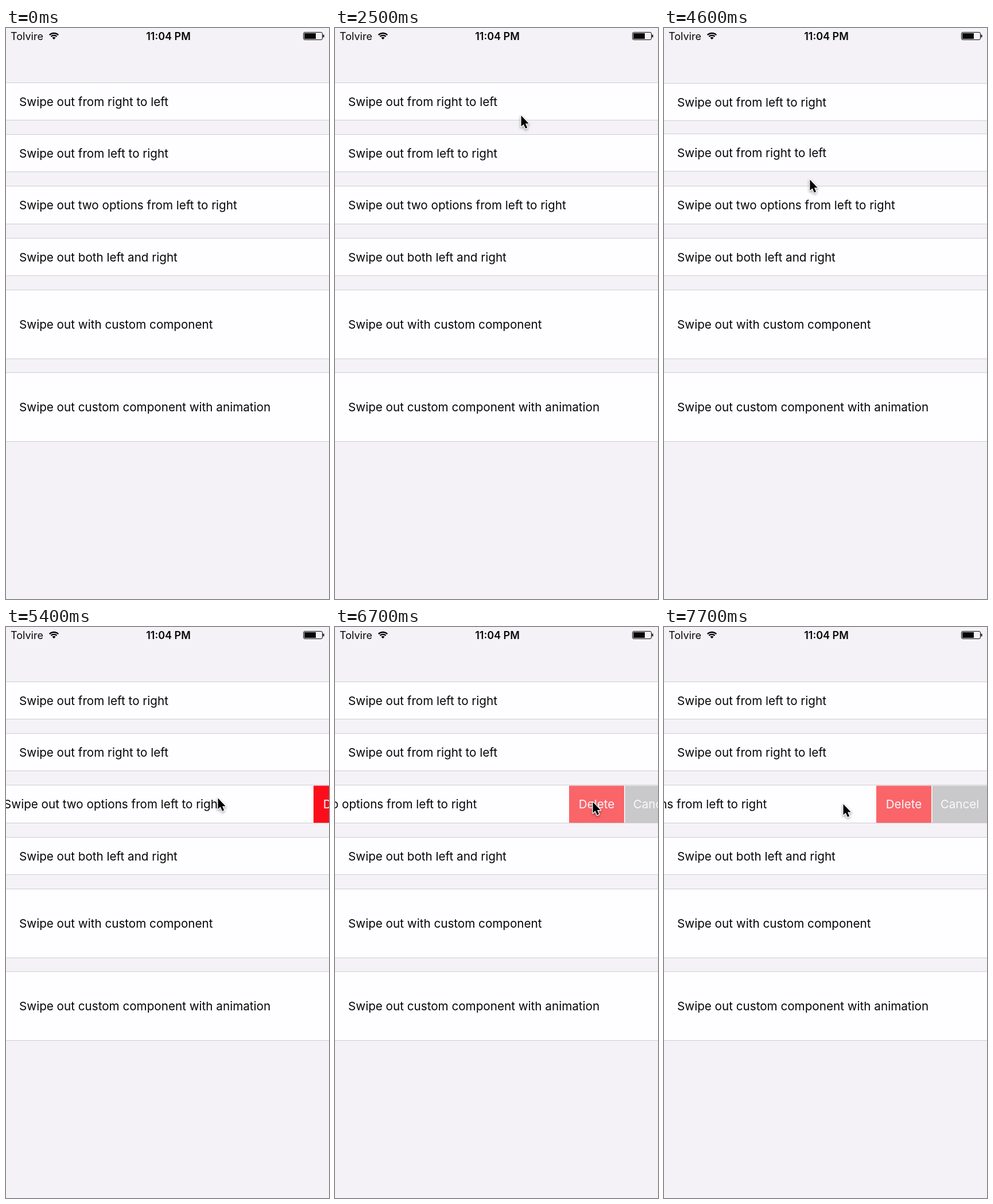
An HTML page with a canvas for the animation above (8000 ms loop, 563 by 995 pixels).

```html
<!DOCTYPE html>
<html lang="en">
<head>
<meta charset="utf-8">
<title>Swipe list</title>
<style>
  html, body { margin: 0; width: 100%; height: 100%; overflow: hidden; background: #f4f2f6; }
  canvas { display: block; }
</style>
</head>
<body>
<canvas id="stage" width="563" height="995"></canvas>
<script>
const ctx = document.getElementById('stage').getContext('2d');
const W = 563, H = 995, LOOP = 8000, STEP = 100;
const FONT = 'Inter, Roboto, sans-serif', TEXT = 20.65;
const BG = '#f4f2f6', PAPER = '#fefdff', LINE = '#cfced2', INK = '#060606';
const RED = '#fc0d1b', PRESSED = '#fa6569', GREEN = '#4bb250', GREY = '#c9c8ca';
const TOP = 95.1, PITCH = 90.35, ROW = 65.4, TALL = 119.5, SPACE = PITCH - ROW;
const BUTTON = 96, GAP = 1.5;

// Pointer moves: start and end time, then the point reached
const moves = [
  [300, 600, 435, 129], [900, 1200, 296, 133], [1400, 1800, 255, 134],
  [2100, 2500, 324, 151], [2500, 2800, 240, 213], [3000, 3400, 404, 225],
  [3500, 3900, 90, 221], [4350, 4800, 385, 296], [4800, 5100, 396, 297],
  [5300, 5900, 234, 295], [5900, 6300, 411, 302], [6500, 7000, 506, 306],
  [7000, 7700, 312, 307]
];

// Each gesture follows the pointer, then settles at rest
const swipeFirst = [{ press: 900, release: 2100, rest: 0 }];
const swipeSecond = [{ press: 3000, release: 3450, rest: BUTTON }, { press: 3900, release: 3900, rest: 0 }];
const swipeThird = [
  { press: 5300, release: 5800, rest: -2 * BUTTON - GAP },
  { press: 6500, release: LOOP, rest: 0 }
];

const unit = v => Math.min(1, Math.max(0, v));
const easeOut = k => 1 - (1 - k) ** 2;
const easeInOut = k => (1 - Math.cos(Math.PI * k)) / 2;
const span = n => n * BUTTON + (n - 1) * GAP;

function pointerAt(t) {
  let x = 590, y = 148;
  for (const [from, to, toX, toY] of moves) {
    const k = unit((t - from) / (to - from));
    x += (toX - x) * k;
    y += (toY - y) * k;
  }
  return [x, y];
}

// Dragging past the buttons meets resistance
function resist(shift, limit) {
  const extra = Math.abs(shift) - limit;
  return extra > 0 ? Math.sign(shift) * (limit + 1.5 * (extra / 1.5) ** 0.715) : shift;
}

function slide(gestures, limit, t) {
  let shift = 0;
  for (const { press, release, rest } of gestures) {
    if (t < press) break;
    const dragged = pointerAt(Math.min(t, release))[0] - pointerAt(press)[0];
    shift = resist(shift + dragged, limit);
    shift += (rest - shift) * easeOut(unit((t - release) / 200));
  }
  return shift;
}

function rect(x, y, w, h, color) {
  ctx.fillStyle = color;
  ctx.fillRect(x, y, w, h);
}

function text(str, x, y, size, { color = INK, weight = 400, align = 'left' } = {}) {
  ctx.font = `${weight} ${size}px ${FONT}`;
  ctx.textAlign = align;
  ctx.fillStyle = color;
  ctx.fillText(str, x, y);
}

function row(label, top, height, shift = 0, buttons = []) {
  const bottom = top + height, baseline = top + height / 2 + 7.75;
  rect(0, top, W, height, PAPER);
  rect(0, Math.floor(top), W, 1, LINE);
  rect(0, Math.floor(bottom), W, 1, LINE);
  text(label, 23 + shift, baseline, TEXT);
  if (!shift) return;
  // Buttons stop once fully shown; the label keeps following the drag
  const full = span(buttons.length);
  const left = Math.round(shift > 0 ? Math.min(shift - full, 0) - 1 : W + Math.max(shift, -full));
  buttons.forEach(([name, color], i) => {
    const x = left + i * (BUTTON + GAP);
    rect(x, top + 0.75, BUTTON, height - 0.75, color);
    text(name, x + BUTTON / 2, baseline, TEXT, { color: '#fbf8fa', align: 'center' });
  });
}

function wifi(x, y) {
  const from = -Math.PI * .75, to = -Math.PI * .25;
  ctx.strokeStyle = ctx.fillStyle = INK;
  ctx.lineWidth = 2.3;
  for (const r of [7.2, 11]) {
    ctx.beginPath();
    ctx.arc(x, y, r, from, to);
    ctx.stroke();
  }
  ctx.beginPath();
  ctx.moveTo(x, y);
  ctx.arc(x, y, 4.2, from, to);
  ctx.fill();
}

function statusBar() {
  text('Tolvire', 8, 20.5, 18);
  wifi(83.5, 20);
  text('11:04 PM', 283, 20.5, 18, { weight: 600, align: 'center' });
  ctx.strokeStyle = INK;
  ctx.lineWidth = 1;
  ctx.beginPath();
  ctx.roundRect(518.5, 7.5, 33, 13, 2.5);
  ctx.stroke();
  rect(520, 9, 20, 10, INK);
  ctx.beginPath();
  ctx.roundRect(552.5, 11.5, 2, 5, 1);
  ctx.fill();
}

function drawPointer(x, y) {
  ctx.save();
  ctx.translate(x + 0.5, y + 1.5);
  const arrow = new Path2D('M0 0V19L4.2 15.2L7.5 22.6L10.6 21.2L7.5 14H13.2Z');
  ctx.lineWidth = 2.6;
  ctx.lineJoin = 'round';
  ctx.strokeStyle = '#fff';
  ctx.shadowColor = 'rgba(0,0,0,.4)';
  ctx.shadowBlur = 4;
  ctx.shadowOffsetY = 2;
  ctx.stroke(arrow);
  ctx.shadowColor = 'transparent';
  ctx.fillStyle = '#000';
  ctx.fill(arrow);
  ctx.restore();
}

function draw(t) {
  rect(0, 0, W, H, BG);
  statusBar();
  const travel = PITCH * easeInOut(unit((t - 4200) / 430));
  const tallTop = TOP + 4 * PITCH;
  row('Swipe out from left to right', TOP + PITCH - travel, ROW,
    slide(swipeSecond, span(1), t), [['Sticky', GREEN]]);
  row('Swipe out from right to left', TOP + travel, ROW,
    slide(swipeFirst, span(1), t), [['Delete', RED]]);
  row('Swipe out two options from left to right', TOP + 2 * PITCH, ROW,
    slide(swipeThird, span(2), t), [['Delete', t > 6500 ? PRESSED : RED], ['Cancel', GREY]]);
  row('Swipe out both left and right', TOP + 3 * PITCH, ROW);
  row('Swipe out with custom component', tallTop, TALL);
  row('Swipe out custom component with animation', tallTop + TALL + SPACE, TALL);
  if (t >= 400) drawPointer(...pointerAt(t));
}

const start = performance.now();
function tick() {
  const t = (performance.now() - start) % LOOP;
  draw(Math.floor(t / STEP) * STEP);
  requestAnimationFrame(tick);
}
tick();
</script>
</body>
</html>
```
